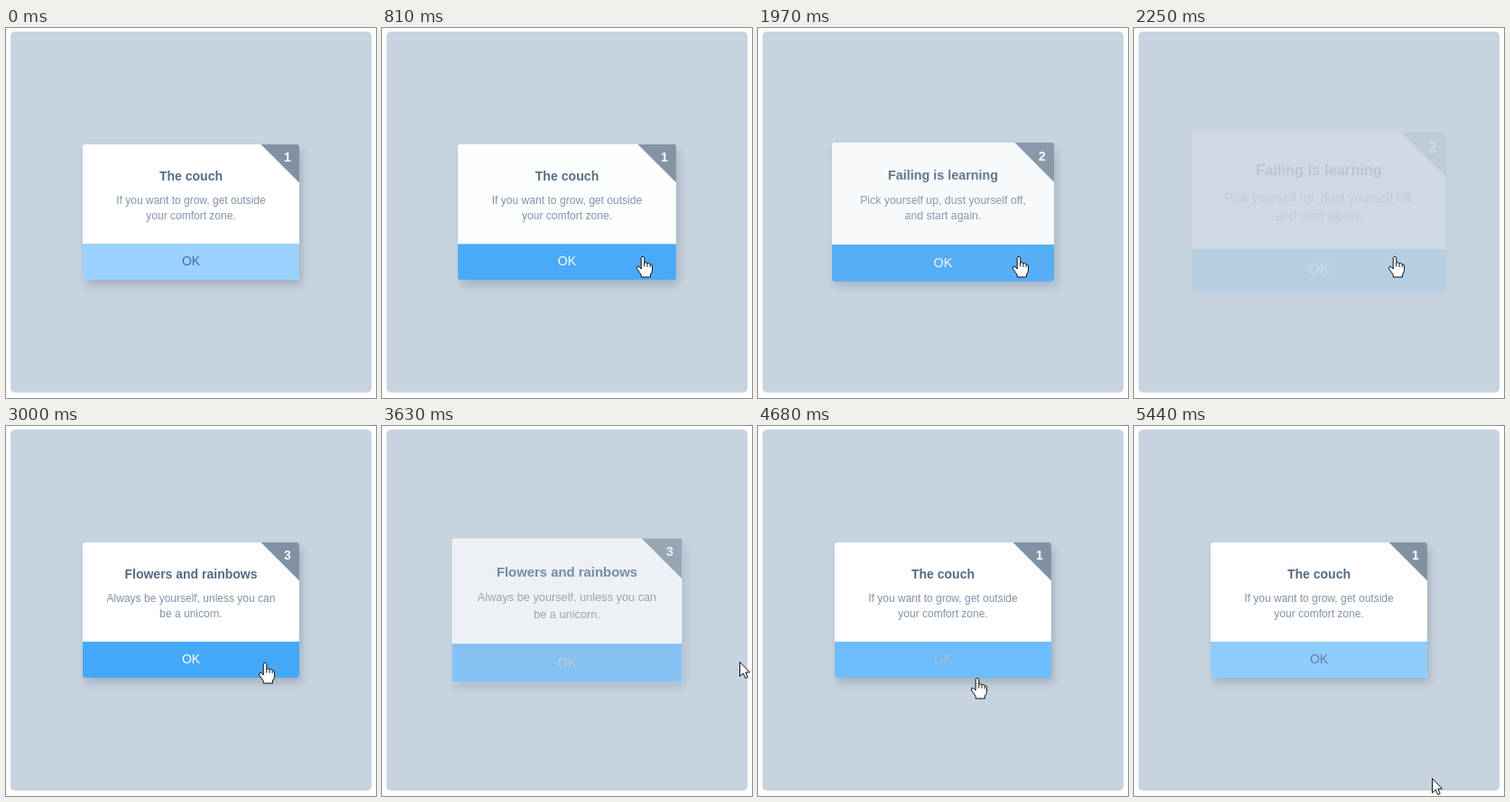
Recreate the animation shown at these times as an HTML page. Size 410x410 px, loop 5.51 s.

```html
<!DOCTYPE html>
<html lang="en">
<head>
<meta charset="utf-8">
<title>Advice cards</title>
<style>
  html, body { margin: 0; width: 100%; height: 100%; overflow: hidden; background: #fff; }
  svg { display: block; width: 100%; height: 100%; }
  text { font-family: "Liberation Sans", Arial, sans-serif; text-anchor: middle; }
  .title { font-size: 14px; font-weight: bold; fill: #556a84; }
  .body { font-size: 12px; fill: #8192a8; }
  .number { font-size: 14px; font-weight: bold; fill: #fff; }
  .label { font-size: 14px; }
</style>
</head>
<body>
<svg viewBox="0 0 410 410">
  <defs>
    <filter id="blur" x="-20%" y="-20%" width="140%" height="140%">
      <feGaussianBlur stdDeviation="5"/>
    </filter>
    <clipPath id="rounded"><rect x="85" y="129" width="240" height="150" rx="3"/></clipPath>
  </defs>
  <rect x="5" y="4" width="400" height="400" rx="5" fill="#c7d4df"/>
  <g id="card">
    <rect x="88" y="135" width="240" height="150" rx="3" fill="#2b4058" opacity=".23" filter="url(#blur)"/>
    <g clip-path="url(#rounded)">
      <rect x="85" y="129" width="240" height="150" fill="#fff"/>
      <path d="M282.5 129H325V171.5Z" fill="#8291a2"/>
      <rect id="button" x="85" y="239" width="240" height="40"/>
    </g>
    <text id="number" class="number" x="312" y="148"></text>
    <text id="title" class="title" x="205" y="169"></text>
    <text id="line1" class="body" x="205" y="195"></text>
    <text id="line2" class="body" x="205" y="212"></text>
    <text id="label" class="label" x="205" y="263">OK</text>
  </g>
  <g id="pointer" fill="#fff" stroke="#111" stroke-linejoin="round">
    <path id="arrow" d="M.5 .5V16.5L4.2 13L6.7 18.5L9.2 17.4L6.8 12H11.5Z"/>
    <g id="hand">
      <path d="M-1.8 14V1.7Q-1.6 .5 0 .5T1.8 1.7V7.2Q3.8 5.9 5 7.8Q7 6.7 8.1 8.7Q10.5 8.2 10.5 11V15.5Q10.5 18 8.5 20V23H-1.8V20.5L-6.5 13.8Q-7.2 11.3 -5.2 11.2Q-3.6 11.2 -1.8 14Z"/>
      <path d="M1.8 7V11.5M5 8V11.8M8.1 9V12.2" fill="none"/>
    </g>
  </g>
</svg>
<script>
const LOOP = 5510, OUT_MS = 450, IN_DELAY = 590, IN_MS = 480, HOVER_MS = 300;

const messages = [
  ["1", "The couch", "If you want to grow, get outside", "your comfort zone."],
  ["2", "Failing is learning", "Pick yourself up, dust yourself off,", "and start again."],
  ["3", "Flowers and rainbows", "Always be yourself, unless you can", "be a unicorn."]
];

// Each visit: message, click that brings it in, pointer enter / leave, click that sends it away
const visits = [
  { message: 0, shown: -2000, enter: 370, leave: Infinity, click: 740 },
  { message: 1, shown: 740, enter: 1565, leave: Infinity, click: 1836 },
  { message: 2, shown: 1836, enter: 2660, leave: 3560, click: 3405 },
  { message: 0, shown: 3405, enter: 4590, leave: 5272, click: Infinity }
];

// Pointer path: time, x, y
const path = [
  [130, 324, 369], [370, 298, 279], [620, 289, 253], [2600, 289, 253],
  [2850, 287, 262], [3470, 287, 262], [3630, 396, 261], [4450, 397, 262],
  [4590, 322, 270], [4670, 243, 279], [5030, 243, 279], [5150, 268, 270],
  [5272, 292, 279], [5440, 330, 390], [5510, 338, 412]
];

const $ = id => document.getElementById(id);
const parts = ["number", "title", "line1", "line2"].map($);
const clamp = v => Math.max(0, Math.min(1, v));
const mix = (a, b, p) => a + (b - a) * p;
const mixColor = (a, b, p) => `rgb(${a.map((v, i) => Math.round(mix(v, b[i], p)))})`;

function bezier(x1, y1, x2, y2) {
  const at = (a, b, u) => 3 * a * u * (1 - u) ** 2 + 3 * b * u * u * (1 - u) + u ** 3;
  return x => {
    x = clamp(x);
    if (x === 0 || x === 1) return x;
    let low = 0, high = 1;
    for (let i = 0; i < 24; i++) {
      const mid = (low + high) / 2;
      if (at(x1, x2, mid) < x) low = mid; else high = mid;
    }
    return at(y1, y2, low);
  };
}
const ease = bezier(.25, .1, .25, 1);
const easeIn = bezier(.42, 0, 1, 1);
const easeInOut = bezier(.42, 0, .58, 1);

function drawCard(t) {
  const visit = visits.find(v => t < v.click + OUT_MS);
  const entering = easeInOut((t - visit.shown - IN_DELAY) / IN_MS);
  const leaving = easeIn((t - visit.click) / OUT_MS);
  const scale = mix(.9, 1, entering) + .2 * leaving;
  $("card").setAttribute("opacity", entering * (1 - leaving));
  $("card").setAttribute("transform", `translate(205 204) scale(${scale}) translate(-205 -204)`);
  messages[visit.message].forEach((text, i) => {
    if (parts[i].textContent !== text) parts[i].textContent = text;
  });

  const hover = ease((t - visit.enter) / HOVER_MS) * (1 - ease((t - visit.leave) / HOVER_MS));
  $("button").setAttribute("fill", mixColor([155, 210, 255], [69, 169, 250], hover));
  $("label").setAttribute("fill", mixColor([69, 108, 144], [255, 255, 255], hover));
}

function drawPointer(t) {
  $("pointer").setAttribute("visibility", t < path[0][0] ? "hidden" : "visible");
  const next = Math.max(1, path.findIndex(p => p[0] > t));
  const a = path[next - 1], b = path[next];
  const p = clamp((t - a[0]) / (b[0] - a[0]));
  $("pointer").setAttribute("transform",
    `translate(${Math.round(mix(a[1], b[1], p))} ${Math.round(mix(a[2], b[2], p))})`);
  const overButton = (t >= 370 && t < 3560) || (t >= 4590 && t < 5272);
  $("hand").setAttribute("display", overButton ? "inline" : "none");
  $("arrow").setAttribute("display", overButton ? "none" : "inline");
}

const start = performance.now();
function frame() {
  const t = (performance.now() - start) % LOOP;
  drawCard(t);
  drawPointer(t);
  requestAnimationFrame(frame);
}
frame();
</script>
</body>
</html>
```
